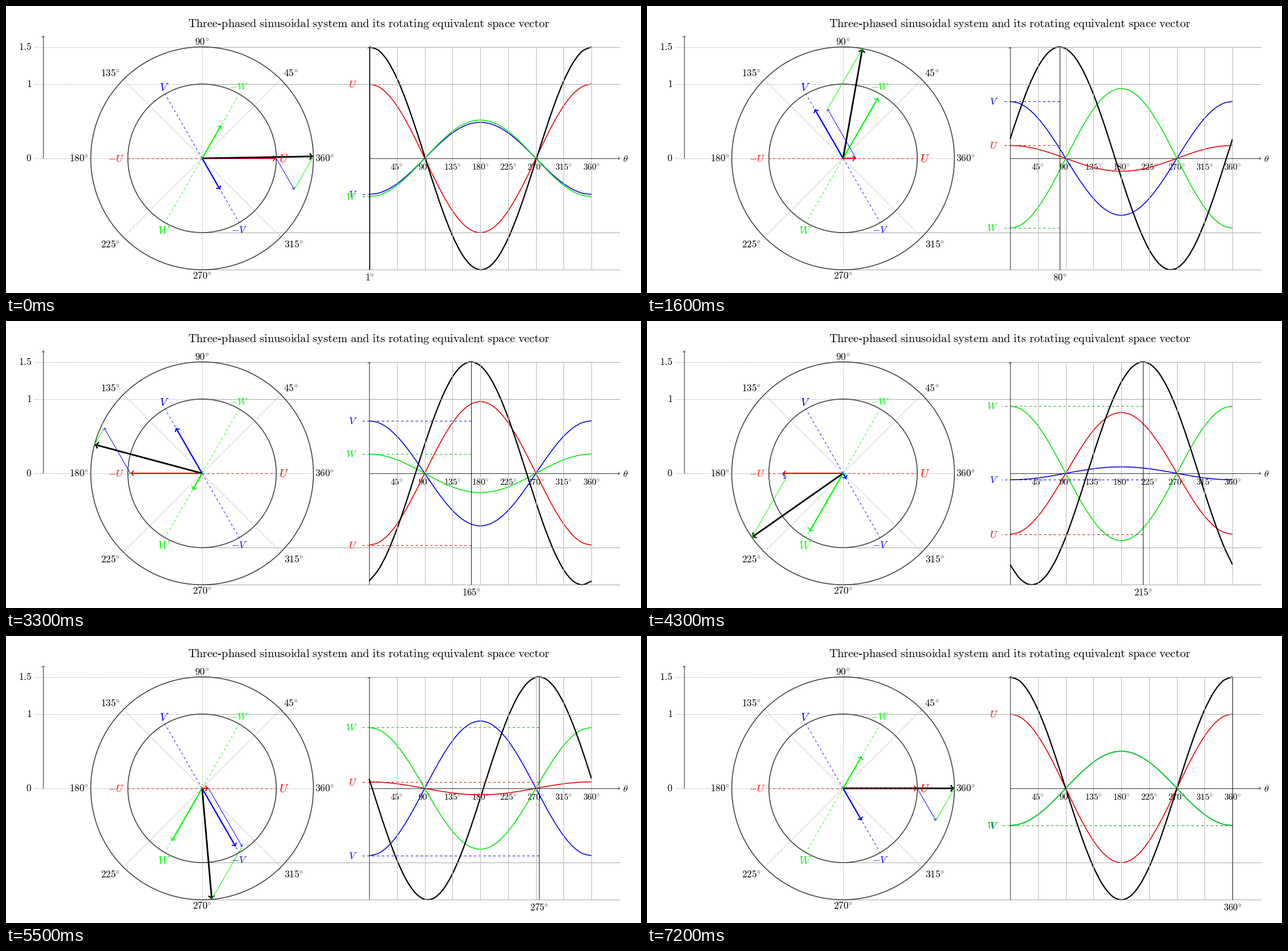
Write a matplotlib script that moves like this. It is 1114 px wide and 503 px high and loops after 7.3 s.

```python
import numpy as np
import matplotlib.pyplot as plt
from matplotlib.animation import FuncAnimation
from matplotlib.patches import Circle, PathPatch
from matplotlib.path import Path

W, H, DPI = 1114, 503, 64
PT = 72 / DPI                      # points per pixel
CX, CY, UNIT = 344, 267, 130.2     # phasor centre and unit length
GX, GW = 637, 390.2                # graph origin and width of 360 degrees
FRAMES = 73

# name, axis angle, vector colour, curve colour, level colour
PHASES = [("U", 0, "#ff0000", "#e60000", "#d00000"),
          ("V", 120, "#0000ff", "#0000e6", "#0000d8"),
          ("W", 240, "#00ff00", "#00e60a", "#00b414")]
DASH = (4.25, 4.25)
DOTS = (0.9, 2.5)

plt.rcParams["mathtext.fontset"] = "cm"
plt.rcParams["font.family"] = "Liberation Serif"

fig = plt.figure(figsize=(W / DPI, H / DPI), dpi=DPI, facecolor="white")
ax = fig.add_axes([0, 0, 1, 1])
ax.set_xlim(0, W)
ax.set_ylim(H, 0)
ax.axis("off")


def polar(r, deg):
    a = np.radians(deg)
    return np.array([CX + r * UNIT * np.cos(a), CY - r * UNIT * np.sin(a)])


def gx(deg):
    return GX + GW * deg / 360


def gy(v):
    return CY - UNIT * v


def line(p, q, color="black", lw=0.8, dash=None, z=2):
    style = (0, [d / lw for d in dash]) if dash else "-"
    return ax.plot([p[0], q[0]], [p[1], q[1]], color=color, lw=lw * PT, ls=style,
                   dash_capstyle="butt", solid_capstyle="butt", zorder=z)[0]


def label(x, y, s, size=17.3, color="black", ha="center", z=3):
    return ax.text(x, y, s, fontsize=size * PT, color=color, ha=ha,
                   va="baseline", zorder=z)


def degrees(n):
    return rf"${n}^{{\circ}}$"


class Arrow:
    """Straight shaft with a curved, open tip."""

    def __init__(self, color, lw, z, snap=False):
        self.size = 0.4 + 0.3 * lw
        self.lw = lw
        self.shaft = line((0, 0), (0, 0), color, lw, z=z)
        self.shaft.set_snap(snap)
        self.tip = PathPatch(Path([(0, 0)]), fc="none", ec=color, lw=0.8 * lw * PT,
                             capstyle="round", joinstyle="round", zorder=z)
        ax.add_patch(self.tip)

    def set(self, p, q):
        p, q = np.asarray(p, float), np.asarray(q, float)
        d = q - p
        n = np.hypot(*d)
        d = d / n if n > 1e-9 else np.array([1.0, 0.0])
        side = np.array([-d[1], d[0]])
        base = q - d * (0.75 * self.size + 0.4 * self.lw)
        shape = [(-3, 4), (-2.75, 2.5), (0, 0.25), (0.75, 0),
                 (0, -0.25), (-2.75, -2.5), (-3, -4)]
        pts = [base + self.size * (u * d + v * side) for u, v in shape]
        self.tip.set_path(Path(pts, [Path.MOVETO] + [Path.CURVE4] * 6))
        self.shaft.set_data([p[0], base[0]], [p[1], base[1]])


class Curve:
    """Smooth curve through samples taken every 15 degrees."""
    theta = np.linspace(0, 360, 25)

    def __init__(self, color, lw, z):
        self.patch = PathPatch(Path([(0, 0)]), fc="none", ec=color, lw=lw * PT,
                               capstyle="butt", zorder=z)
        ax.add_patch(self.patch)

    def set(self, amp, shift=0):
        vals = amp * np.cos(np.radians(self.theta - shift))
        p = np.column_stack([gx(self.theta), gy(vals)])
        t = np.zeros_like(p)
        t[1:-1] = 0.1526 * (p[2:] - p[:-2])
        pts = [p[0]]
        for i in range(len(p) - 1):
            pts += [p[i] + t[i], p[i + 1] - t[i + 1], p[i + 1]]
        codes = [Path.MOVETO] + [Path.CURVE4] * (len(pts) - 1)
        self.patch.set_path(Path(pts, codes))


def draw_static():
    words = "phased sinusoidal system and its rotating equivalent space vector"
    title = r"$\mathrm{Three}$-$\mathrm{" + words.replace(" ", r"\ ") + "}$"
    label(636.3, 37, title, 20.33)

    # left scale
    Arrow("black", 0.8, 2, snap=True).set((65.2, CY), (65.2, 52))
    for v, s in [(1.5, "1.5"), (1, "1"), (0, "0")]:
        label(45, gy(v) + 5.5, f"${s}$", ha="right")
        line((50, gy(v)), (CX, gy(v)), "#333333", dash=DOTS)

    # phasor plane
    for r in (1, 1.5):
        ax.add_patch(Circle((CX, CY), r * UNIT, fc="none", ec="#404040",
                            lw=1.6 * PT, zorder=6.5))
    for a in (0, 45, 90, 135, 225, 270, 315):
        line((CX, CY), polar(1.5, a), "#333333", dash=DOTS)
    marks = [(45, 500, 123), (90, 344, 69), (135, 183, 123), (180, 127.5, 273),
             (225, 183, 423), (270, 344, 478), (315, 504.5, 423), (360, 558.5, 273)]
    for a, x, y in marks:
        label(x, y, degrees(a))

    for _, a, color, _, _ in PHASES:
        for end in (a, a + 180):
            line((CX, CY), polar(1, end), color, 0.9, DASH, z=9)
    names = [("U", 487.5, 274.5, 193.5, 273), ("V", 278, 149, 409, 398),
             ("W", 278, 400.5, 409, 147)]
    for (name, x, y, nx, ny), phase in zip(names, PHASES):
        label(x, y, f"${name}$", 20, phase[2], z=9)
        label(nx, ny, f"$-{name}$", 17.3, phase[2], z=9)

    # graph
    for v in (1.5, 1, -1, -1.5):
        line((CX, gy(v)), (1077, gy(v)), "#a6a6a6", 1, z=6)
    for a in range(45, 361, 45):
        line((gx(a), gy(1.5)), (gx(a), gy(-1.5)), "#b8b8b8", 1, z=6)
        label(gx(a), 287, degrees(a), 15.3)
    Arrow("black", 0.8, 6, snap=True).set((GX, CY), (1077, CY))
    Arrow("black", 0.8, 6, snap=True).set((GX, gy(-1.5)), (GX, gy(1.5)))
    label(1086.5, 273, r"$\theta$", 16.5)


draw_static()

curves = [Curve(p[3], 1.6, 4) for p in PHASES]
total_curve = Curve("black", 2.2, 5)
vectors = [Arrow(p[2], 2.3, 7) for p in PHASES]
chain = [Arrow(p[2], 1, 8.5) for p in PHASES[1:]]
total = Arrow("black", 2.8, 8)
levels = [line((GX, CY), (622, CY), p[4], 1, DASH, z=5.5) for p in PHASES]
tags = [label(616, CY, f"${p[0]}$", 17.3, p[3], "right", 5.5) for p in PHASES]
cursor = line((GX, gy(1.5)), (GX, gy(-1.5)), "black", 0.9, z=6.2)
readout = label(GX, 481, "", 16.5)


def update(i):
    phi = 5 * i if i else 1
    x = gx(phi)
    centre = np.array([CX, CY], float)
    tips = []
    for k, phase in enumerate(PHASES):
        value = np.cos(np.radians(phi - phase[1]))
        y = gy(value)
        tip = polar(value, phase[1])
        tips.append(tip)
        vectors[k].set(centre, tip)
        curves[k].set(value)
        levels[k].set_data([x, 622], [y, y])
        tags[k].set_y(y + 6)
    joint = tips[0] + tips[1] - centre
    end = polar(1.5, phi)
    chain[0].set(tips[0], joint)
    chain[1].set(joint, end)
    total.set(centre, end)
    total_curve.set(1.5, phi)
    cursor.set_xdata([x, x])
    readout.set_x(x)
    readout.set_text(degrees(phi))
    return []


anim = FuncAnimation(fig, update, frames=FRAMES, interval=100,
                     init_func=lambda: update(0), repeat=True, repeat_delay=0,
                     blit=False)
plt.show()
```
